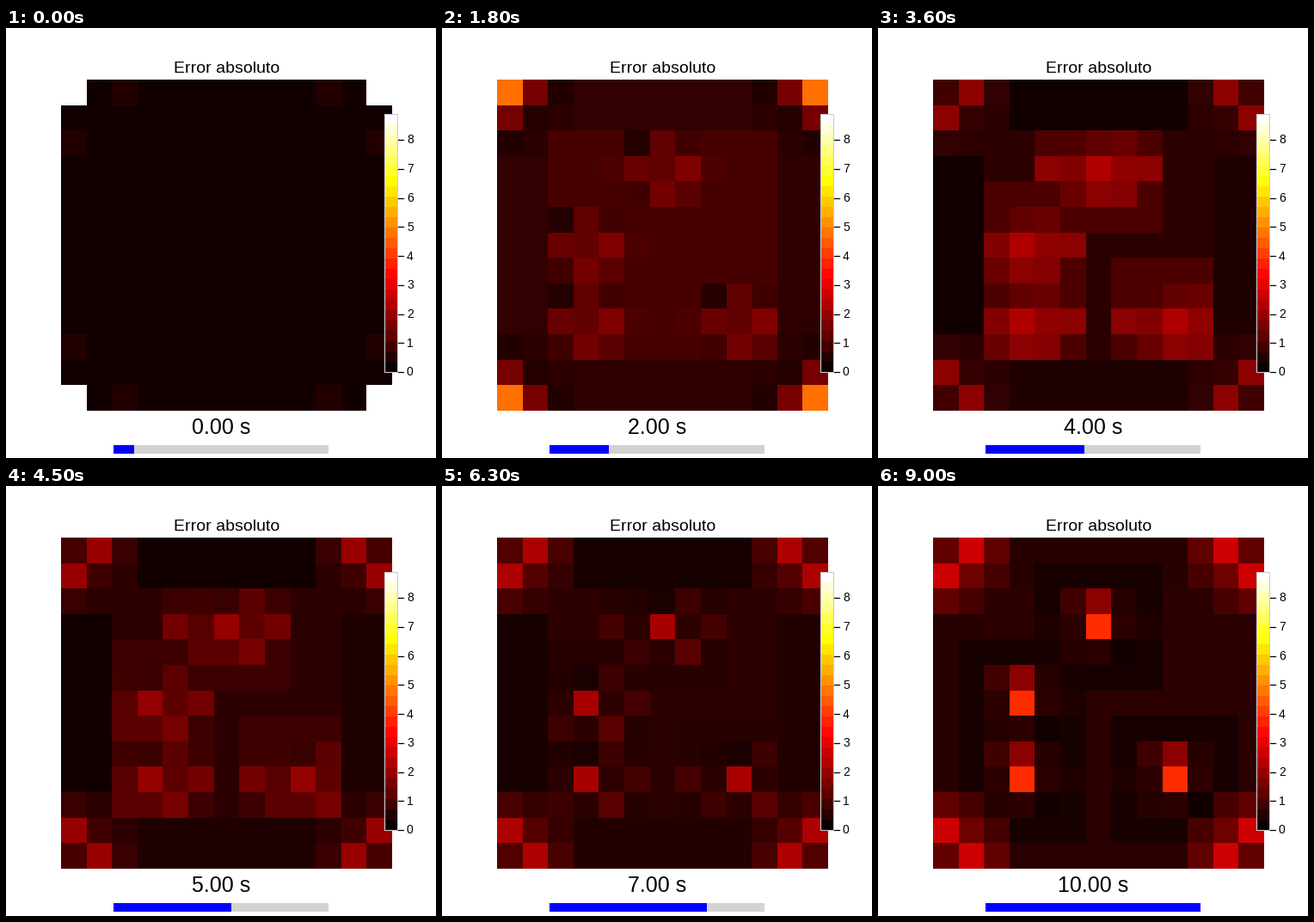
Recreate the animation shown at these times as a matplotlib script. Size 500 px wide and 500 px high, loop 9900 ms.

```python
import numpy as np
import matplotlib.pyplot as plt
from matplotlib.animation import FuncAnimation
from matplotlib.patches import Rectangle

plt.rcParams["font.family"] = "Liberation Sans"

N = 13            # cells per side
BANDS = 25        # colour steps between 0 and the maximum error
STEPS = 11        # seconds 0 to 10
SOURCES = ((6, 3), (3, 6), (3, 9), (9, 9))

# Key points (seconds, colour level) of each part of the field
KEYS = {
    "inside": ((0, 1, 2, 4), (0, 1, 2, 1)),
    "rim": ((0, 1, 2, 4, 6, 10), (0, 1, 1.2, 0, 0, 0.8)),
    "core": ((0, 1, 2, 4, 6, 10), (0, 6.5, 3, 5.9, 4, 10.5)),
    "above": ((0, 2, 4, 6, 8, 10), (0, 3, 3, 0, 0.7, 4.5)),
    "side": ((0, 2, 4, 6), (0, 3.7, 4.5, 1)),
    "diagonal": ((0, 1, 4, 8, 10), (0, 1, 3.3, 1.1, 0.8)),
    "lean": ((1, 2, 8, 10), (0, 0.5, 0.5, -0.5)),
    "halo": ((0, 1, 2, 4, 6, 10), (0, 1, 2, 2.2, 1, 0.2)),
    "far": ((0, 1, 4, 8, 10), (0, 1, 4.5, 1, 0.5)),
}

Y, X = np.mgrid[:N, :N]
EDGE_X, EDGE_Y = np.minimum(X, N - 1 - X), np.minimum(Y, N - 1 - Y)
NEAR, AWAY = np.minimum(EDGE_X, EDGE_Y), np.maximum(EDGE_X, EDGE_Y)
INSIDE = NEAR > 1


def background(t, k):
    """Interior, darker rim and the four mirrored corners."""
    g = np.full((N, N), k["inside"])
    g[~INSIDE] = (k["rim"] + min(t, 1)) / 2
    g[(NEAR < 2) & ((X < 2) | (Y < 2))] = k["rim"]
    return g


def add_halos(g, k):
    for sx, sy in SOURCES:
        dx, dy = abs(X - sx), abs(Y - sy)
        ring = np.maximum(dx, dy) == 2
        g[ring & INSIDE] = k["halo"]
        g[ring & ~INSIDE] = np.minimum(g, k["halo"])[ring & ~INSIDE]
        g[(dx == 2) & (dy == 0) & INSIDE] = k["far"]


def add_sources(g, t, k):
    drift = 0.8 * np.exp(-t / 3) * min(t, 1)
    for sx, sy in SOURCES:
        for dy in (-1, 0, 1):
            for dx in (-1, 0, 1):
                if dx and dy:
                    level = k["diagonal"] + k["lean"] * (dx + dy)
                elif dx or dy > 0:
                    level = k["side"] + drift * dx
                else:
                    level = k["above"] if dy else k["core"]
                g[sy + dy, sx + dx] = level


def add_corners(g, t):
    levels = {
        (0, 0): max(25 - 6 * t, 1 + 0.2 * t),
        (0, 1): min(2.4 * t, 3 + 0.4 * t),
        (1, 1): 0.35 * t,
        (0, 2): max(0.65 - t, 0.3 * t),
        (1, 2): max(min(t, 1), 0.2 * t),
    }
    for (near, away), level in levels.items():
        g[(NEAR == near) & (AWAY == away)] = level


def error_at(t):
    """Colour position of every cell at second t."""
    k = {name: np.interp(t, *points) for name, points in KEYS.items()}
    g = background(t, k)
    add_halos(g, k)
    add_sources(g, t, k)
    add_corners(g, t)
    return (np.maximum(g, 0) + 0.3) / BANDS


fig = plt.figure(figsize=(5, 5), dpi=100, facecolor="white")
ax = fig.add_axes([0, 0, 1, 1])
ax.axis("off")


def heat(data, extent, z):
    return ax.imshow(data, cmap="hot", vmin=0, vmax=1, aspect="auto",
                     interpolation="nearest", extent=extent, zorder=z)


def strip(width, color):
    return ax.add_patch(Rectangle((125, 485), width, 10, fc=color, lw=0,
                                  antialiased=False))


image = heat(error_at(0), (64, 449, 445, 60), 1)
heat(np.linspace(1, 0, BANDS)[:, None], (440, 455, 400, 100), 2)
ax.add_patch(Rectangle((440, 100), 15, 300, fill=False, ec="#cccccc",
                       lw=0.8, zorder=3))
for n in range(9):
    y = 400 - 33.75 * n
    ax.plot([456, 462], [y, y], color="black", lw=0.9, zorder=3)
    ax.text(466, y - 1, str(n), size=10, va="center_baseline")

ax.text(256.5, 52, "Error absoluto", size=14, ha="center", va="baseline")
clock = ax.text(250, 472, "", size=18, ha="center", va="baseline")
strip(250, "#d3d3d3")
bar = strip(0, "#0000ff")
ax.set_xlim(0, 500)
ax.set_ylim(500, 0)


def update(t):
    image.set_data(error_at(t))
    clock.set_text(f"{t:.2f} s")
    bar.set_width(min(250, 250 * (t + 1) / STEPS + 1))
    return image, clock, bar


anim = FuncAnimation(fig, update, frames=STEPS, interval=900, repeat=True,
                     repeat_delay=0, blit=False)
plt.show()
```
